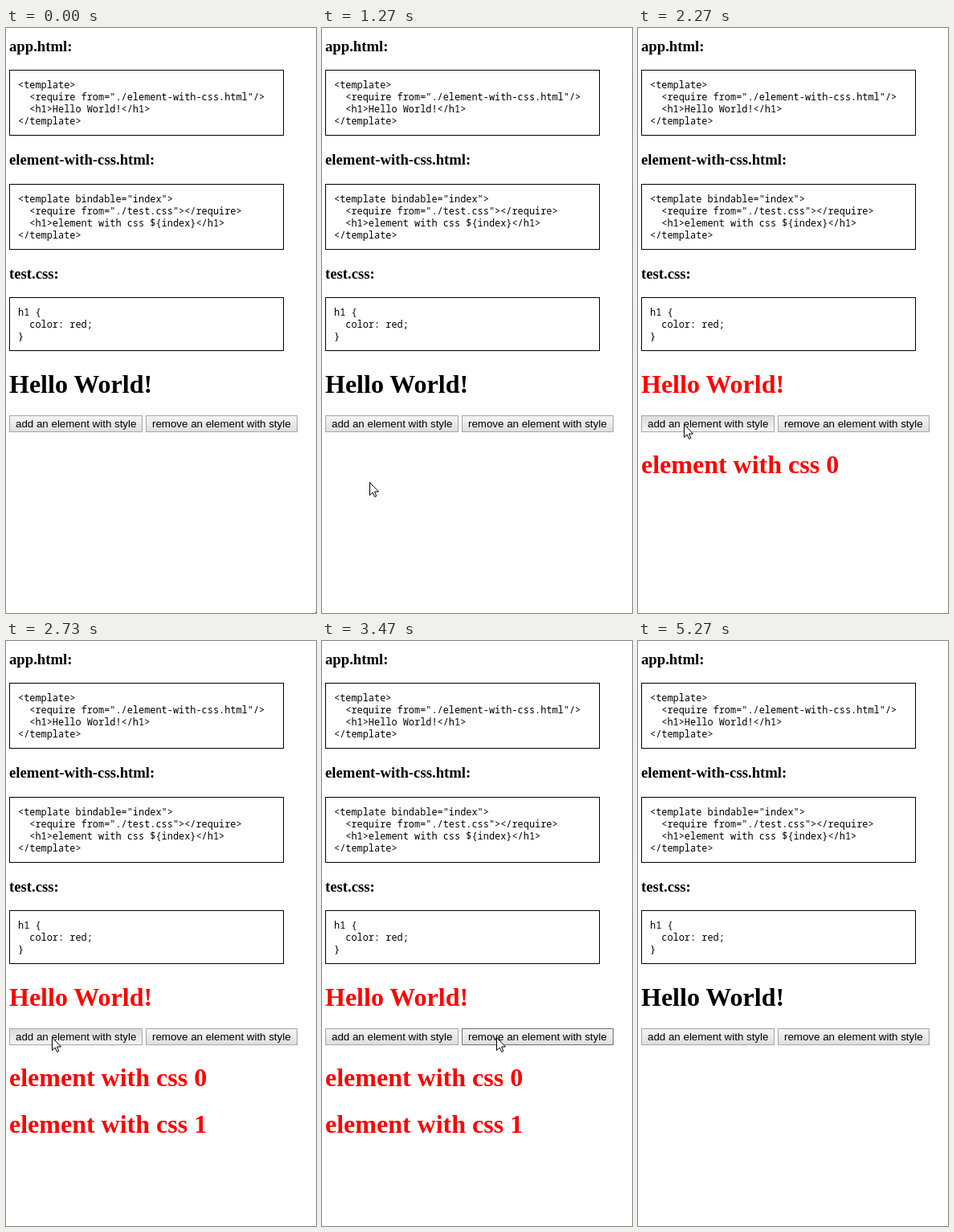
Recreate the animation shown at these times as an HTML page. Size 386 px wide and 728 px high, loop 5.67 s.

```html
<!DOCTYPE html>
<html lang="en">
<head>
<meta charset="utf-8">
<title>Elements with style</title>
<style>
  html, body { margin: 0; width: 100%; height: 100%; overflow: hidden; background: #fff; }
  svg { display: block; width: 386px; height: 728px; }
  text { white-space: pre; }
  .h1, .h3 { font-family: "Liberation Serif", "Times New Roman", serif; font-weight: bold; }
  .h1 { font-size: 32px; }
  .h3 { font-size: 18.72px; }
  .code { font-family: "Noto Sans Mono", "DejaVu Sans Mono", monospace; font-size: 11.91px; }
  .label { font-family: "Liberation Sans", Arial, sans-serif; font-size: 13.333px; }
</style>
</head>
<body>
<svg id="stage" viewBox="0 0 386 728">
  <defs>
    <linearGradient id="up" x2="0" y2="1">
      <stop stop-color="#f5f5f5"/><stop offset="1" stop-color="#dedede"/>
    </linearGradient>
    <linearGradient id="down" x2="0" y2="1">
      <stop stop-color="#dcdcdc"/><stop offset="1" stop-color="#f5f5f5"/>
    </linearGradient>
  </defs>
</svg>
<script>
const stage = document.getElementById("stage");
const TICK = 1000 / 15;
const LOOP = 5670;
const RED = "#f00";

function add(name, attrs, text) {
  const el = document.createElementNS("http://www.w3.org/2000/svg", name);
  for (const key in attrs) el.setAttribute(key, attrs[key]);
  if (text) el.textContent = text;
  return stage.appendChild(el);
}

const write = (kind, x, y, text) => add("text", { class: kind, x, y }, text);

function listing(title, titleY, top, lines) {
  write("h3", 4, titleY, title);
  add("rect", {
    x: 4.5, y: top + 0.5, width: 341, height: lines.length * 15 + 21,
    fill: "none", stroke: "#000"
  });
  lines.forEach((line, i) => write("code", 15, top + 23 + i * 15, line));
}

function button(x, width, text) {
  const box = add("rect", { x: x + 0.5, y: 482.5, width: width - 1, height: 20 });
  write("label", x + 8, 497, text);
  return { x, width, box };
}

listing("app.html:", 29, 52, [
  "<template>",
  "  <require from=\"./element-with-css.html\"/>",
  "  <h1>Hello World!</h1>",
  "</template>"
]);
listing("element-with-css.html:", 170, 194, [
  "<template bindable=\"index\">",
  "  <require from=\"./test.css\"></require>",
  "  <h1>element with css ${index}</h1>",
  "</template>"
]);
listing("test.css:", 312, 335, ["h1 {", "  color: red;", "}"]);

const hello = write("h1", 4, 454, "Hello World!");
const addButton = button(4, 166, "add an element with style");
const removeButton = button(174, 189, "remove an element with style");
const items = [554, 612, 671].map((y, i) => write("h1", 4, y, "element with css " + i));
items.forEach(item => item.setAttribute("fill", RED));

const pointer = add("path", {
  d: "M.5 .5V16.5L4.2 13L6.6 18.5L8.8 17.5L6.5 12H11.5Z",
  fill: "#fff", stroke: "#000"
});

// Clicks as [press tick, release tick].
const addClicks = [[26, 28], [34, 36], [41, 43]];
const removeClicks = [[51, 52], [59, 60], [67, 69]];

// Pointer path as [tick, x, y].
const path = [
  [3, 385, 727], [7, 250, 610], [9, 150, 530], [11, 90, 494], [12, 78, 498],
  [14, 64, 575], [16, 60, 622], [19, 59, 565], [21, 58, 524], [22, 57, 508],
  [24, 57, 493], [44, 57, 493], [45, 130, 500], [46, 205, 499], [48, 217, 493],
  [74, 217, 493], [75, 208, 520], [78, 114, 712], [79, 90, 760]
];

function pointerAt(tick) {
  const next = path.findIndex(p => p[0] > tick);
  if (next === 0) return path[0].slice(1);
  if (next < 0) return path[path.length - 1].slice(1);
  const [t0, x0, y0] = path[next - 1];
  const [t1, x1, y1] = path[next];
  const k = (tick - t0) / (t1 - t0);
  return [Math.round(x0 + (x1 - x0) * k), Math.round(y0 + (y1 - y0) * k)];
}

const released = (clicks, tick) => clicks.filter(c => tick >= c[1]).length;

function paintButton({ x, width, box }, clicks, tick, px, py) {
  const pressed = clicks.some(c => tick >= c[0] && tick < c[1]);
  const hover = px >= x && px < x + width && py >= 482 && py < 503;
  box.setAttribute("fill", pressed ? "url(#down)" : "url(#up)");
  box.setAttribute("stroke", hover && !pressed ? "#707070" : "#a6a6a6");
}

function draw(ms) {
  const tick = Math.floor((ms % LOOP + 4) / TICK);
  const [px, py] = pointerAt(tick);
  const count = released(addClicks, tick) - released(removeClicks, tick);
  hello.setAttribute("fill", count ? RED : "#000");
  items.forEach((item, i) => item.setAttribute("visibility", i < count ? "visible" : "hidden"));
  paintButton(addButton, addClicks, tick, px, py);
  paintButton(removeButton, removeClicks, tick, px, py);
  pointer.setAttribute("transform", `translate(${px} ${py})`);
}

const start = performance.now();
function frame() {
  draw(performance.now() - start);
  requestAnimationFrame(frame);
}
frame();
</script>
</body>
</html>
```
